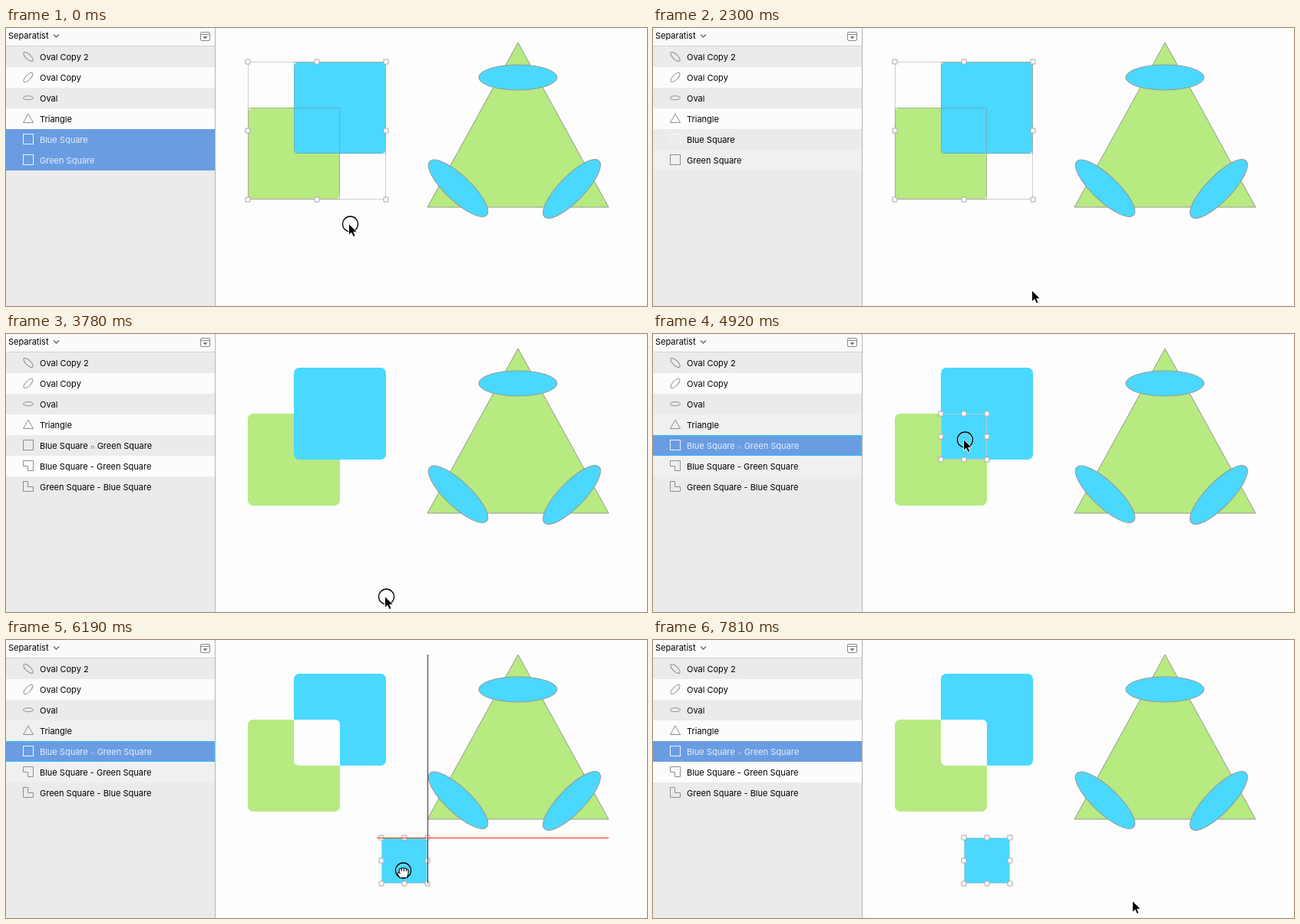
An HTML page that plays this animation: 835x363 px, repeating every 8000 ms.

```html
<!DOCTYPE html>
<html lang="en">
<head>
<meta charset="utf-8">
<title>Splitting overlapping squares</title>
<style>
html, body { margin: 0; width: 100%; height: 100%; overflow: hidden; background: #fdfdfd; }
svg { display: block; }
text { font: 11px Inter, Roboto, sans-serif; fill: #000; }
.light text { fill: #e6effc; }
.icon { fill: none; stroke: #8e8e8e; }
.light .icon { stroke: #eef4fd; }
.blue { fill: #4ad8ff; }
.green { fill: #b7ea80; }
.shape { stroke: #979797; }
.frame { fill: none; stroke: #8a8a8a; stroke-opacity: .55; }
.bounds { fill: none; stroke: #cfcfcf; }
.red { stroke: #ff2a12; fill: none; }
.dark { stroke: #3c3434; fill: none; }

/* every change is a hard step; percentages are time / 8000 ms */
.anim { animation: 8s step-end infinite; }

.pair-on { animation-name: pair-on; }
@keyframes pair-on { 0% { opacity: 1 } 28.75%, 100% { opacity: 0 } }
.pair-off { animation-name: pair-off; }
@keyframes pair-off { 0% { opacity: 0 } 28.75% { opacity: 1 } 34.25%, 100% { opacity: 0 } }
.fresh-icon { animation-name: fresh-icon; }
@keyframes fresh-icon { 0% { stroke: #f4f4f2 } 30.5%, 100% { stroke: #8e8e8e } }
.parts { animation-name: parts; }
@keyframes parts { 0% { opacity: 0 } 34.25%, 100% { opacity: 1 } }
.parts-plain { animation-name: parts-plain; }
@keyframes parts-plain { 0% { opacity: 1 } 61.5%, 100% { opacity: 0 } }
.picked { animation-name: picked; }
@keyframes picked { 0% { opacity: 0 } 61.5%, 100% { opacity: 1 } }
.held { animation-name: held; }
@keyframes held { 0% { opacity: 0 } 61.5% { opacity: 1 } 88.5%, 100% { opacity: 0 } }
.inner { animation-name: inner; }
@keyframes inner { 0% { opacity: 1 } 30.5%, 100% { opacity: 0 } }
.both { animation-name: both; }
@keyframes both { 0% { opacity: 1 } 47.25%, 100% { opacity: 0 } }
.cut { animation-name: cut; }
@keyframes cut { 0% { opacity: 0 } 70.375%, 100% { opacity: 1 } }

.drag { animation-name: drag; }
@keyframes drag {
  0% { transform: translate(375px, 104px) }
  70.375% { transform: translate(431px, 176px) }
  71.875% { transform: translate(481px, 234px) }
  73.625% { transform: translate(487px, 249px) }
  75.5% { transform: translate(489px, 258px) }
  81.125% { transform: translate(440px, 258px) }
  83%, 100% { transform: translate(405px, 258px) }
}
.lag { animation-name: lag; }
@keyframes lag {
  0% { transform: none }
  71.875% { transform: translate(-16px, 0) }
  73.625%, 100% { transform: none }
}
.guide-gap { animation-name: guide-gap; }
@keyframes guide-gap { 0% { opacity: 0 } 71.875% { opacity: 1 } 73.625%, 100% { opacity: 0 } }
.guide-edge { animation-name: guide-edge; }
@keyframes guide-edge { 0% { opacity: 0 } 75.5% { opacity: 1 } 81.125%, 100% { opacity: 0 } }
.guide-low { animation-name: guide-low; }
@keyframes guide-low { 0% { opacity: 0 } 81.125% { opacity: 1 } 88.5%, 100% { opacity: 0 } }
.guide-mid { animation-name: guide-mid; }
@keyframes guide-mid { 0% { opacity: 0 } 83% { opacity: 1 } 88.5%, 100% { opacity: 0 } }

.pointer { animation-name: pointer; }
@keyframes pointer {
  0% { transform: translate(446px, 256px) }
  4.5% { transform: translate(452px, 266px) }
  6.375% { transform: translate(470px, 299px) }
  8.125% { transform: translate(487px, 332px) }
  10% { transform: translate(493px, 343px) }
  50.5% { transform: translate(489px, 334px) }
  52.375% { transform: translate(473px, 297px) }
  54.125% { transform: translate(447px, 237px) }
  56% { transform: translate(422px, 179px) }
  57.75% { transform: translate(408px, 147px) }
  59.625% { transform: translate(404px, 138px) }
  70.375% { transform: translate(460px, 210px) }
  71.875% { transform: translate(516px, 282px) }
  73.625% { transform: translate(520px, 293px) }
  75.5% { transform: translate(518px, 300px) }
  77.375% { transform: translate(515px, 301px) }
  81.125% { transform: translate(466px, 301px) }
  83% { transform: translate(436px, 301px) }
  84.75% { transform: translate(428px, 300px) }
  88.5% { transform: translate(436px, 302px) }
  90.375% { transform: translate(472px, 309px) }
  92.125% { transform: translate(532px, 322px) }
  94% { transform: translate(587px, 333px) }
  95.75% { transform: translate(615px, 339px) }
  97.625%, 100% { transform: translate(624px, 341px) }
}
.ring { animation-name: ring; }
@keyframes ring {
  0% { opacity: 1 } 4.5% { opacity: 0 }
  47.25% { opacity: 1 } 50.5% { opacity: 0 }
  61.5% { opacity: 1 } 88.5%, 100% { opacity: 0 }
}
.arrow { animation-name: arrow; }
@keyframes arrow { 0% { opacity: 1 } 65.125% { opacity: 0 } 88.5%, 100% { opacity: 1 } }
.fist { animation-name: fist; }
@keyframes fist { 0% { opacity: 0 } 65.125% { opacity: 1 } 88.5%, 100% { opacity: 0 } }
</style>
</head>
<body>
<svg width="835" height="363" viewBox="0 0 835 363">
  <defs>
    <rect id="knob" x="-3" y="-3" width="6" height="6" rx=".5" fill="#fff" stroke="#a2a2a2"/>
    <rect id="box" x="22.5" y="6.5" width="13" height="13"/>
    <path id="overlap" d="M0 0H53Q60 0 60 7V60H7Q0 60 0 53Z"/>
    <path id="notch-low" d="M22.5 6.5H35.5V19.5H28.5V13.5H22.5Z"/>
    <path id="notch-high" d="M22.5 6.5H28.5V13.5H35.5V19.5H22.5Z"/>
  </defs>

  <!-- canvas shapes -->
  <rect width="835" height="363" fill="#fdfdfd"/>
  <path class="green shape" d="M667 19L785 234H549Z"/>
  <g class="blue shape">
    <ellipse cx="666.8" cy="64.5" rx="51" ry="16.5"/>
    <ellipse rx="51" ry="16.5" transform="translate(589 209.3) rotate(43.5)"/>
    <ellipse rx="51" ry="16.5" transform="translate(737 210) rotate(-46)"/>
  </g>
  <rect class="green" x="315" y="104" width="120" height="120" rx="7"/>
  <rect class="blue" x="375" y="44" width="120" height="120" rx="7"/>
  <use href="#overlap" x="375" y="104" fill="#fdfdfd" class="anim cut"/>

  <g class="anim both">
    <path class="bounds" d="M315.5 44.5H494.5V223.5H315.5Z"/>
    <path class="frame" d="M375.5 104.5H315.5V223.5H434.5V163.5M375.5 104.5V44.5H494.5V163.5H434.5"/>
    <path class="frame anim inner" d="M375.5 104.5H434.5V163.5H375.5Z"/>
    <g class="knobs" data-size="180" transform="translate(315 44)"></g>
  </g>

  <g class="anim drag">
    <g class="anim cut"><use href="#overlap" class="blue anim lag"/></g>
    <g class="anim picked">
      <path class="bounds" d="M.5 .5H59.5V59.5H.5Z" stroke-opacity=".8"/>
      <g class="knobs" data-size="60"></g>
    </g>
  </g>

  <!-- smart guides -->
  <g class="anim guide-gap">
    <path class="dark" d="M541.5 162V294"/>
    <path class="red" d="M473 234.5H785M541.5 153V160M548.5 153V160M541 156.5H549"/>
    <text x="541.5" y="155" style="fill:#ff2a12">8</text>
  </g>
  <g class="anim guide-edge">
    <path class="dark" d="M549.5 19V318"/>
    <path class="red" d="M483 258.5H785"/>
  </g>
  <path class="red anim guide-low" d="M399 258.5H784.5"/>
  <path class="dark anim guide-mid" d="M435.5 104V318"/>

  <!-- layer list -->
  <rect width="272" height="363" fill="#ebebeb"/>
  <rect width="272" height="23" fill="#fafafa"/>
  <path d="M0 23.5H272" stroke="#d2d2d2"/>
  <text x="3" y="14">Separatist</text>
  <path d="M62 8.5L65.5 12L69 8.5" fill="none" stroke="#666" stroke-width="1.3"/>
  <rect x="253.5" y="5.5" width="12" height="11" rx="1.5" fill="none" stroke="#8a8a8a"/>
  <path d="M254 8.5H265" stroke="#8a8a8a"/>
  <path d="M256.5 11H262.5L259.5 14.5Z" fill="#777"/>

  <g transform="translate(0 24)">
    <ellipse class="icon" rx="8" ry="3.2" transform="translate(29 13.5) rotate(44)"/>
    <text x="44" y="18">Oval Copy 2</text>
  </g>
  <g transform="translate(0 51)">
    <rect width="272" height="27" fill="#fcfcfc"/>
    <ellipse class="icon" rx="8" ry="3.2" transform="translate(29 13.5) rotate(-46)"/>
    <text x="44" y="18">Oval Copy</text>
  </g>
  <g transform="translate(0 78)">
    <ellipse class="icon" cx="29" cy="13.2" rx="6.5" ry="2.5"/>
    <text x="44" y="18">Oval</text>
  </g>
  <g transform="translate(0 105)">
    <rect width="272" height="27" fill="#fcfcfc"/>
    <rect width="272" height="27" fill="#f0f0f0" class="anim held"/>
    <path class="icon" d="M29 7L35.5 18.5H22.5Z"/>
    <text x="44" y="18">Triangle</text>
  </g>

  <g class="anim pair-on">
    <g class="light" transform="translate(0 132)">
      <rect width="272" height="54" fill="#6a9ce2"/>
      <use href="#box" class="icon"/>
      <text x="44" y="18">Blue Square</text>
      <use href="#box" class="icon" y="27"/>
      <text x="44" y="45">Green Square</text>
    </g>
  </g>
  <g class="anim pair-off">
    <g transform="translate(0 132)">
      <rect y="27" width="272" height="27" fill="#f0f0f0"/>
      <use href="#box" class="icon anim fresh-icon"/>
      <text x="44" y="18">Blue Square</text>
      <use href="#box" class="icon" y="27"/>
      <text x="44" y="45">Green Square</text>
    </g>
  </g>
  <g class="anim parts">
    <g transform="translate(0 132)">
      <g class="anim parts-plain">
        <use href="#box" class="icon"/>
        <text x="44" y="18">Blue Square <tspan font-size="8" style="font-size:8px">∩</tspan> Green Square</text>
      </g>
      <rect y="27" width="272" height="27" fill="#fcfcfc"/>
      <rect y="27" width="272" height="27" fill="#f0f0f0" class="anim held"/>
      <use href="#notch-low" class="icon" y="27"/>
      <text x="44" y="45">Blue Square - Green Square</text>
      <use href="#notch-high" class="icon" y="54"/>
      <text x="44" y="72">Green Square - Blue Square</text>
      <g class="light anim picked">
        <rect width="272" height="27" fill="#6a9ce2"/>
        <use href="#box" class="icon"/>
        <text x="44" y="18">Blue Square <tspan style="font-size:8px">∩</tspan> Green Square</text>
        <path class="anim held" d="M0 .75H271.25V26.25H0" fill="none" stroke="#3fb6f6" stroke-width="1.5"/>
      </g>
    </g>
  </g>
  <path d="M272.5 0V363" stroke="#b4b4b4"/>

  <!-- pointer -->
  <g class="anim pointer">
    <g class="anim ring" fill="none">
      <circle cx="2.5" r="9" stroke="#fff" stroke-opacity=".6"/>
      <circle cx="2.5" r="10" stroke="#000" stroke-width="1.3"/>
    </g>
    <path class="anim arrow" d="M.5 -.5V14.5L4 11.3L6.4 16.6L9 15.5L6.7 10.3H11.4Z" fill="#000" stroke="#fff" stroke-width=".9"/>
    <g class="anim fist" fill="#fff" stroke="#000" stroke-width="1.1" stroke-linejoin="round">
      <path d="M-2 9.5L-4.3 5.5Q-5.5 2.5 -3 2L-2.6 -1.5Q-1.5 -3.6 .2 -2.2Q1.6 -4.6 3.4 -2.8Q5.2 -4 6.4 -2Q8.8 -2.4 9 .4V4.5L7.4 9.5Z"/>
      <path d="M.2 -2V1M3.4 -2.6V1M6.4 -1.8V1M-3 2L-1.6 4.2" fill="none"/>
    </g>
  </g>
</svg>
<script>
// eight resize knobs around each square selection
for (const g of document.querySelectorAll('.knobs')) {
  const half = g.dataset.size / 2;
  for (let i = 0; i < 9; i++) {
    if (i === 4) continue;
    const knob = document.createElementNS('http://www.w3.org/2000/svg', 'use');
    knob.setAttribute('href', '#knob');
    knob.setAttribute('x', (i % 3) * half);
    knob.setAttribute('y', Math.floor(i / 3) * half);
    g.append(knob);
  }
}
</script>
</body>
</html>
```
